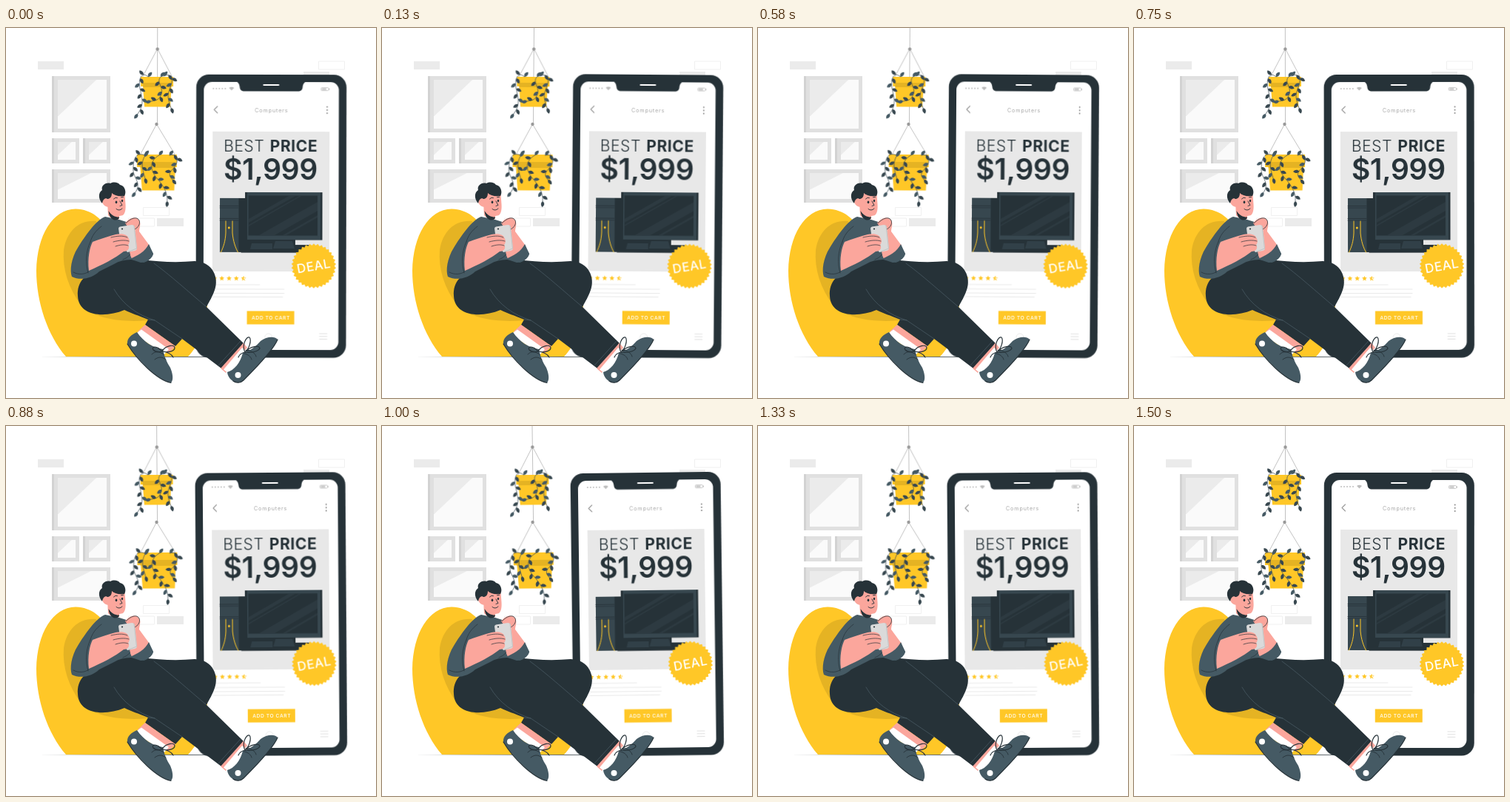
These frames come from a looping animation (500 px wide and 500 px high, 1540 ms). An HTML page:

```html
<!DOCTYPE html>
<html lang="en">
<head>
<meta charset="utf-8">
<title>Best price</title>
<style>
html, body { margin: 0; width: 100%; height: 100%; overflow: hidden; background: #fff; }
svg { display: block; width: 100vw; height: 100vh; }
text { font-family: Inter, "Open Sans", sans-serif; }
.sway { animation: sway 1.54s linear -45ms infinite; }
#plants { transform-origin: 203px 123px; }
#phone { transform-origin: 358px 254px; }
@keyframes sway {
  0%, 100% { transform: rotate(0deg); }
  25% { transform: rotate(1deg); }
  75% { transform: rotate(-1deg); }
}
.dark { fill: #263238; }
.slate { fill: #37474f; }
.blue { fill: #455a64; }
.gold { fill: #ffc727; }
.skin { fill: #fba69c; }
.line { fill: none; stroke-linecap: round; stroke-linejoin: round; }
</style>
</head>
<body>
<svg viewBox="0 0 500 500">
  <!-- wall -->
  <g fill="#ebebeb">
    <path d="M43 45h35v11H43zM402 59h35v8h-35zM204 257h36v11h-36z"/>
    <path d="M422.500 45h35v11h-35zM185.500 242.500h35v11h-35zM165.500 257h35v11h-35z" fill="none" stroke="#f0f0f0"/>
  </g>
  <g id="frames"></g>
  <path class="dark" d="M43 444.400L250 444.100L457 444.400L250 444.700z"/>

  <!-- hanging plants -->
  <g id="plants" class="sway">
    <g class="line" stroke="#a6a6a6" stroke-width=".7">
      <path d="M204.500-6V130M204.500 28L184 67M204.500 28L225 67M203.500 130L181 172M203.500 130L229 172"/>
    </g>
    <g fill="#999"><circle cx="204.500" cy="28.500" r="2.200"/><circle cx="203.500" cy="130" r="2.200"/></g>
    <path class="gold" d="M182 66H226V79H223.500L222 106.500H187L185 79H182zM177 171H231V188H229L227.500 219.500H184L181.500 188H177z"/>
    <path d="M185 74H223.500V80H185zM181.500 181H229V189H181.500z" opacity=".1"/>
    <g id="vines"></g>
  </g>

  <!-- big phone -->
  <g id="phone" class="sway">
    <rect class="dark" x="256.800" y="63" width="203" height="382.500" rx="17"/>
    <rect x="267" y="73" width="182.500" height="362" rx="11" fill="#fff"/>
    <path class="dark" d="M309 72H407C402 73 401 76 400.500 80C400 84 398 85.500 394 85.500H322C318 85.500 316 84 315.500 80C315 76 314 73 309 72z"/>
    <path class="line" d="M348 77H368" stroke="#fff" stroke-width="2"/>
    <g fill="#bdbdbd">
      <path class="line" d="M280 82H296.500" stroke="#c4c4c4" stroke-width="2.200" stroke-dasharray="0 4"/>
      <path d="M301 81Q304.500 78.500 308 81L304.500 84.500z"/>
      <rect x="425.500" y="80.500" width="10" height="4" rx="1" fill="none" stroke="#bdbdbd" stroke-width=".8"/>
      <path d="M426.500 81.500h6v2h-6zM436 81.500h1v2h-1z"/>
    </g>
    <path class="line" d="M285.500 106L281 110.500L285.500 115" stroke="#999" stroke-width="1.100"/>
    <path class="line" d="M433.700 106.500V115" stroke="#8a8a8a" stroke-width="2" stroke-dasharray="0 4.200"/>
    <text x="336" y="113.500" font-size="7.200" letter-spacing=".85" fill="#a6a6a6">Computers</text>

    <rect x="279" y="140" width="158" height="189" fill="#e8e8e8"/>
    <g class="dark">
      <text x="294" y="167" font-size="21" font-weight="300" letter-spacing=".6">BEST</text>
      <text x="356.500" y="167" font-size="21" font-weight="700" letter-spacing=".6">PRICE</text>
      <text x="294" y="205.300" font-size="39" font-weight="600" letter-spacing="-.3">$1,999</text>
    </g>

    <!-- computer -->
    <path class="dark" d="M289 230H327V303H289z"/>
    <path class="slate" d="M289 230H314.500V303H289z"/>
    <path class="line" d="M289 240.500H314M289 243H314M289 257.500H314M289 260H314" stroke="#263238" stroke-width=".8"/>
    <path class="line" d="M297 261V277C296.500 288 294 296 290.500 303M306 261V277C307 288 310 297 313.500 303" stroke="#ffc727"/>
    <circle class="gold" cx="301.300" cy="270" r="1.500"/>
    <path class="dark" d="M320 284H391V293H412V303H320zM323 222H427.500V286.500H323z"/>
    <path class="slate" d="M326 222H425V286H326z"/>
    <path class="dark" d="M327.500 226.500H421V280.500H327.500z"/>
    <path d="M382 227H391L328 263V258zM396 227H399L328 268V266zM421 235V247L363 280H342zM421 253V256L379 280H374z" fill="#37474f" opacity=".4"/>
    <path class="slate" d="M332 291H360V299H330zM364 288H387L390 298H361z" opacity=".7"/>
    <path class="line" d="M318 303.300H410" stroke="#263238" stroke-width=".8"/>

    <!-- badge -->
    <path id="badge" class="gold"/>
    <text transform="rotate(-10 416 321.500)" x="416" y="327.600" text-anchor="middle" font-size="17" font-weight="500" letter-spacing=".5" fill="#fff">DEAL</text>

    <g id="stars" class="gold"></g>
    <path class="line" d="M280 347H343M280 353H376M280 358.500H376M280 363.500H374" stroke="#e0e0e0" stroke-width=".7"/>
    <path class="gold" d="M325.800 382.600H389.800V400.600H325.800z"/>
    <text x="358.200" y="394.200" text-anchor="middle" font-size="6.700" font-weight="500" letter-spacing=".6" fill="#fff">ADD TO CART</text>
    <path class="line" d="M424 413H434M424 416.700H434M424 420.400H434" stroke="#d9d9d9" stroke-width=".8"/>
    <circle cx="355" cy="418" r="5" fill="none" stroke="#ebebeb"/>
  </g>

  <!-- bean bag -->
  <path class="gold" d="M81 444C56 415 41 370 41 328C42 280 63 245 94 244.500C116 245 130 258 142 278L240 350L272 374C270 402 262 428 246 444z"/>
  <path d="M122 261C98 259 82 275 78 300C76 325 84 352 102 375C120 394 160 398 192 395L150 330z" opacity=".1"/>

  <!-- trousers -->
  <path class="dark" d="M97 362C96 343 106 332 130 324C148 313 164 311 182 313Q222 318 255 315C280 316 288 338 282 354C279 363 275 369 271 377L321 426L291 460L238 420L229 430L188 401L192 394C178 388 170 386 160 381C134 392 98 390 97 362z"/>
  <g class="line" stroke="#526670" stroke-width=".6">
    <path d="M200 318C222 334 246 356 271 377M146 353C158 374 178 388 201 395L238 420M192 394L201 395"/>
    <path d="M317 423L287 456"/>
  </g>

  <!-- left foot -->
  <path class="skin" d="M188 401L229 430L219 440L178 410z"/>
  <path d="M183 407.500L220 434L214 441L174 414z" fill="#fff"/>
  <path class="blue" d="M164 427C163 419 170 414 177 411C186 424 198 432 212 434C214 444 217 451 222 459C225 466 227 475 223 479.500C205 476 177 448 164 427z"/>
  <path class="line" d="M164 427C177 449 205 476 223 479.500" stroke="#263238" stroke-width="1.200"/>
  <path class="line" d="M197 441C202 436 207 437 213 441M201 448C206 444 211 444 216 448" stroke="#263238" stroke-width=".9"/>
  <path class="line" d="M211 437C215 429 228 427 228 432C228 437 219 439 211 437C203 428 196 431 199 435C202 438 207 438 211 437C218 438 224 441 226 445" stroke="#263238" stroke-width="1.200"/>
  <circle cx="173" cy="426.500" r="4" fill="#fff"/>

  <!-- right foot -->
  <path class="skin" d="M321 425.500L290 460L297 466L326 432z"/>
  <path d="M319 432L294 461.500L302 468L327 438z" fill="#fff"/>
  <path class="blue" d="M299 465C308 463 317 452 320 439C331 436 338 430 344 423C352 417 363 416 367 421C362 434 340 457 321 476C313 484 300 476 299 465z"/>
  <path class="line" d="M367 421C362 434 340 457 321 476C317 480 311 480 307 477" stroke="#263238" stroke-width="1.200"/>
  <path class="line" d="M322 440C327 441 331 444 332 448M329 436C334 438 337 440 338 444" stroke="#263238" stroke-width=".9"/>
  <path class="line" d="M323 438C318 429 325 416 329 418C332 422 329 433 323 438C330 430 343 428 343 433C340 438 330 439 323 438C319 439 315 442 314 445" stroke="#263238" stroke-width="1.200"/>
  <circle cx="313.500" cy="469" r="4" fill="#fff"/>

  <!-- body -->
  <path class="blue" d="M134 255C121 260 107 281 97 297C88 311 86 328 89 336C101 342 117 338 126 329L146 319C158 312 174 311 186 317C192 315 197 311 199 305L190 290L172 265L153 259z"/>
  <path class="line" d="M114 289C108 301 107 318 111 331M169 304C165 310 162 311 158 313M91 330C98 334 107 333 112 329M129 268C121 274 116 281 114 289" stroke="#263238" stroke-width=".7"/>

  <!-- head -->
  <path class="skin" d="M137 236L138 253Q145 261 153 258L153 248z"/>
  <path class="dark" d="M138.500 247C142 253 147 255.500 153 255.500C153 259 149 260.500 145 259C141 257 139 252 138.500 247z"/>
  <path class="skin" d="M136 222C144 216 158 217 160.500 225L161.500 238C162 245 161 250 158.500 252.500C152 256.500 143 252 139 242C134 242 130 238 130 234C130 229 134 228 136 231z"/>
  <path class="dark" d="M130 237C124 230 125 222 130 219C128 213 135 208 141 210C146 207 152 209 154 212C161 213 163 222 160 227C152 228 146 226 143 223C143 229 140 231 137 231C134 229 131 232 130 237z"/>
  <g class="dark"><ellipse cx="149" cy="235.300" rx="1.300" ry="1.900"/><ellipse cx="157" cy="233.500" rx="1.200" ry="1.800"/></g>
  <path class="line" d="M145.500 231Q148 228 150.500 229.500M155.500 228.800L158.500 228.500M154 234L157 239.500L154 240.500M149 244.500Q153 248 157 244" stroke="#263238" stroke-width=".9"/>

  <!-- right forearm, small phone, left forearm -->
  <path class="skin" d="M161 264C166 256 177 254 180 260C183 265 180 270 180 275L194 294C192 302 181 308 170 312C164 301 169 286 170 275z"/>
  <path class="line" d="M162 264C168 257 177 254 180 260C182 265 178 270 174 272" stroke="#263238" stroke-width=".8"/>
  <path class="blue" d="M167 312C178 308 188 302 193 292L199 305C198 311 190 317 182 317z"/>
  <path d="M152 271Q152 269 154 268.500L170 266Q173 266 174 269L177 297Q177 300 174 301L164 303L155 292z" fill="#dadada"/>
  <path class="line" d="M173 267L176.500 298L165 302.500" stroke="#b8b8b8" stroke-width=".7"/>
  <circle class="dark" cx="157" cy="271.500" r="1.100"/>
  <path class="skin" d="M112 328C110 311 113 297 117 289C127 285 137 282 148 279C156 277 164 279 165 283C168 287 167 291 165 293C168 297 165 302 159 302C148 311 130 320 112 328z"/>
  <path class="line" d="M142 283C150 281 158 280 164 283M145 289C152 287 160 286 166 288M148 295C154 293 160 292 165 294" stroke="#263238" stroke-width=".7"/>
</svg>

<script>
const $ = id => document.getElementById(id);

function add(parent, tag, attrs) {
  const el = document.createElementNS('http://www.w3.org/2000/svg', tag);
  for (const k in attrs) el.setAttribute(k, attrs[k]);
  return parent.appendChild(el);
}

// Closed polygon alternating between two radii
function spikes(cx, cy, n, outer, inner) {
  const pts = [];
  for (let i = 0; i < n * 2; i++) {
    const a = i * Math.PI / n - Math.PI / 2, r = i % 2 ? inner : outer;
    pts.push((cx + r * Math.cos(a)).toFixed(2) + ' ' + (cy + r * Math.sin(a)).toFixed(2));
  }
  return 'M' + pts.join('L') + 'z';
}

function frame(x, y, w, h, k) {
  const g = $('frames'), ix = x + 8, iy = y + 5, iw = w - 13, ih = h - 10;
  add(g, 'rect', { x, y, width: w, height: h, fill: '#e0e0e0' });
  add(g, 'rect', { x, y, width: 3, height: h, fill: '#d2d2d2' });
  add(g, 'rect', { x: ix, y: iy, width: iw, height: ih, fill: '#fafafa' });
  add(g, 'path', { d: `M${ix} ${iy}h${iw * k}L${ix} ${iy + ih * (k - 0.04)}z`, fill: '#ebebeb' });
}

// Stem with leaves on alternating sides and one at the tip
function vine(d, gap = 6.8) {
  const g = $('vines');
  const stem = add(g, 'path', { d, class: 'line', stroke: '#37474f', 'stroke-width': 0.7 });
  const len = stem.getTotalLength();
  const n = Math.round(len / gap);
  for (let i = 0; i <= n; i++) {
    const s = len * i / n;
    const p = stem.getPointAtLength(s), q = stem.getPointAtLength(Math.max(0, s - 1));
    const tilt = i === n ? 0 : i % 2 ? 50 : -50;
    const a = Math.atan2(p.y - q.y, p.x - q.x) * 180 / Math.PI + tilt;
    add(g, 'path', {
      d: 'M0 0C2-3.200 5.500-3.200 8 0C5.500 2.600 2 2.600 0 0z',
      class: i % 3 ? 'slate' : 'blue',
      transform: `translate(${p.x} ${p.y}) rotate(${a})`
    });
  }
}

frame(62, 65, 79, 76, 0.79);
frame(62, 149, 37, 34, 0.78);
frame(104, 149, 37, 34, 0.78);
frame(62, 191, 79, 45, 0.68);

[
  'M192 66C184 58 178 68 181 82S187 104 178 116',
  'M209 66C202 72 213 80 210 89S202 98 196 99',
  'M213 65C223 60 227 68 222 80S219 97 223 108',
  'M188 172C173 166 172 182 172 192S184 210 175 222',
  'M187 174C181 186 186 194 188 203',
  'M207 172C192 180 196 194 204 203S219 222 218 234',
  'M221 172C234 168 234 182 226 190S222 201 225 205'
].forEach(d => vine(d));

$('badge').setAttribute('d', spikes(416, 321.5, 34, 30.3, 27.8));

for (let i = 0; i < 5; i++) {
  const x = 282 + i * 9.8;
  add($('stars'), 'path', { d: spikes(x, 338.5, 5, 3.6, 1.7) });
  if (i === 4) add($('stars'), 'path', { d: `M${x + 0.3} 337.200l1 .3 1.300 .2-1.300 1 .4 1.200-1.400-.7z`, fill: '#fff' });
}
</script>
</body>
</html>
```
